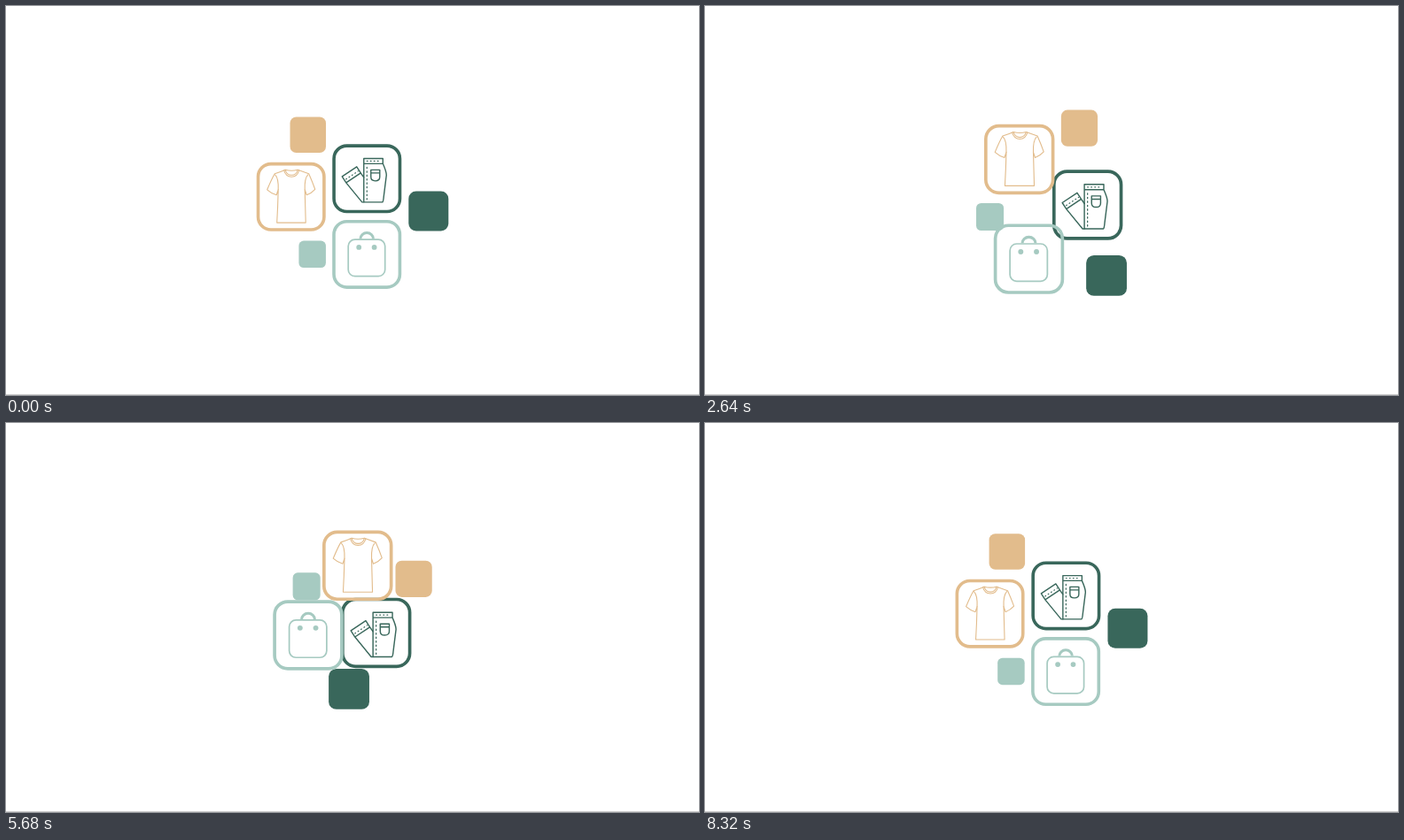
An HTML page that plays this animation: 782x440 px, repeating every 8.4 s.

```html
<!DOCTYPE html>
<html lang="en">
<head>
<meta charset="utf-8">
<title>Clothes tiles</title>
<style>
  html, body { margin: 0; width: 100%; height: 100%; overflow: hidden; background: #fff; }
  svg { display: block; width: 100vw; height: 100vh; }
</style>
</head>
<body>
<svg id="stage" viewBox="0 0 782 440" fill="none" stroke-linecap="round" stroke-linejoin="round">
  <rect width="782" height="440" fill="#fff"/>
  <rect y="439" width="782" height="1" fill="#cfcfcf"/>
</svg>
<script>
const LOOP = 8400, FRAME = 80, STEPS = 8, STEP = LOOP / STEPS, START = 75, TURN = 135;
const CX = 391, CY = 222.7;
const GREEN = '#39675b', MINT = '#a6cac1', TAN = '#e2bc8c';

const pants = `<g stroke="${GREEN}" stroke-width="1.4">
  <path d="M-3.5-22.8H18V-17H-3.5ZM-3.5-17V26.5H17.5Q18.5 26 19 20L22-4Q22-8 18-17"/>
  <path d="M-28-2.5L-11.5-13.5L-7-6.5L-23.5 4.5ZM-23.5 4.5L-5.5 26.5H-3.5M-7-6.5L-3.5-1.5"/>
  <path d="M4.5-10H14.5V-2Q14.5 2.5 9.5 2.5T4.5-2ZM4.5-6.5H14.5"/>
  <path d="M0-13V24" stroke-width="1.2" stroke-dasharray="1.4 3"/>
  <path d="M0-19.9H16M-23.5 .5L-10-8.5" stroke-width="1.2" stroke-dasharray=".8 3.2"/></g>`;

const bag = `<g stroke="${MINT}">
  <rect x="-21" y="-16.8" width="41.5" height="41.6" rx="7.5" stroke-width="1.7"/>
  <path d="M-7.3-17.5A7.3 6.8 0 0 1 7.3-17.5" stroke-width="3" stroke-linecap="butt"/>
  <path d="M-9-8h0M8.4-8h0" stroke-width="5.8"/></g>`;

const shirt = `<g stroke="${TAN}" stroke-width="1.1">
  <path d="M-6.5-30.5Q-12-28-18.5-26Q-22-20-27-8Q-22-3.5-16.5-2L-14.5-8Q-15 12-16 29.3H16.5Q16 12 15.5-8L17.5-2Q23-4 27-8.5Q24-17 20-26Q13-28.5 7.5-30.5"/>
  <path d="M-18-25Q-14-21-14.5-8M19-25Q15-21 15.5-8"/>
  <path d="M-6.5-30.5Q-5-24.5 .5-24.5T7.5-30.5Q.5-28.5-6.5-30.5"/>
  <path d="M-8-30Q-6-22.6 .5-22.6T9-30"/></g>`;

// Drawn back to front; x and y are offsets from the middle of the layout.
const tiles = [
  { x: 86, y: 9, size: 45, r: 8.5, color: GREEN },
  { x: -45, y: 58, size: 30.5, r: 5.5, color: MINT },
  { x: 16.5, y: -27.5, size: 78, color: GREEN, icon: pants },
  { x: 16.5, y: 58, size: 78, color: MINT, icon: bag },
  { x: -50, y: -77, size: 40.5, r: 7, color: TAN },
  { x: -69, y: -7, size: 78, color: TAN, icon: shirt }
];

const bell = (t, mid, width) => Math.exp(-(((t - mid) / width) ** 2));

// Each step pulls the tiles together, spins them and lets them spring out a little too far.
const overshoot = t => bell(t, 560, 200);
const spreadAt = t => 1 - .6 * bell(t, 245, 90) + .045 * overshoot(t);
const turnAt = t => 1 / (1 + Math.exp((241 - t) / 30)) + .022 * overshoot(t);

// Slow swell over the whole loop.
const zoomAt = t => 1 + .013 * (1 - Math.cos(2 * Math.PI * t / LOOP));

function build() {
  const stage = document.getElementById('stage');
  for (const tile of tiles) {
    const { size, r, color, icon } = tile;
    const w = icon ? size - 3.6 : size;
    tile.node = document.createElementNS(stage.namespaceURI, 'g');
    tile.node.innerHTML = `<rect x="${-w / 2}" y="${-w / 2}" width="${w}" height="${w}" rx="${r || 14.5}" ` +
      (icon ? `stroke="${color}" stroke-width="3.6"/>${icon}` : `fill="${color}"/>`);
    stage.append(tile.node);
  }
}

// Middle of the extent that the tiles cover along one axis.
function middle(places, axis, zoom) {
  const low = places.map((p, i) => p[axis] - tiles[i].size * zoom / 2);
  const high = places.map((p, i) => p[axis] + tiles[i].size * zoom / 2);
  return (Math.min(...low) + Math.max(...high)) / 2;
}

function draw(t) {
  const u = (t - START + LOOP) % LOOP, step = Math.floor(u / STEP), local = u % STEP;
  const angle = (step + turnAt(local)) * TURN * Math.PI / 180;
  const zoom = zoomAt(t), spread = zoom * spreadAt(local);
  const c = Math.cos(angle) * spread, s = Math.sin(angle) * spread;
  const places = tiles.map(({ x, y }) => [x * c - y * s, x * s + y * c]);
  const dx = CX - middle(places, 0, zoom), dy = CY - middle(places, 1, zoom);
  tiles.forEach(({ node }, i) => {
    const [x, y] = places[i];
    node.setAttribute('transform', `translate(${(x + dx).toFixed(2)} ${(y + dy).toFixed(2)}) scale(${zoom.toFixed(4)})`);
  });
}

build();
const begin = performance.now();
function tick() {
  const t = (performance.now() - begin) % LOOP;
  draw(Math.floor(t / FRAME) * FRAME);
  requestAnimationFrame(tick);
}
tick();
</script>
</body>
</html>
```
